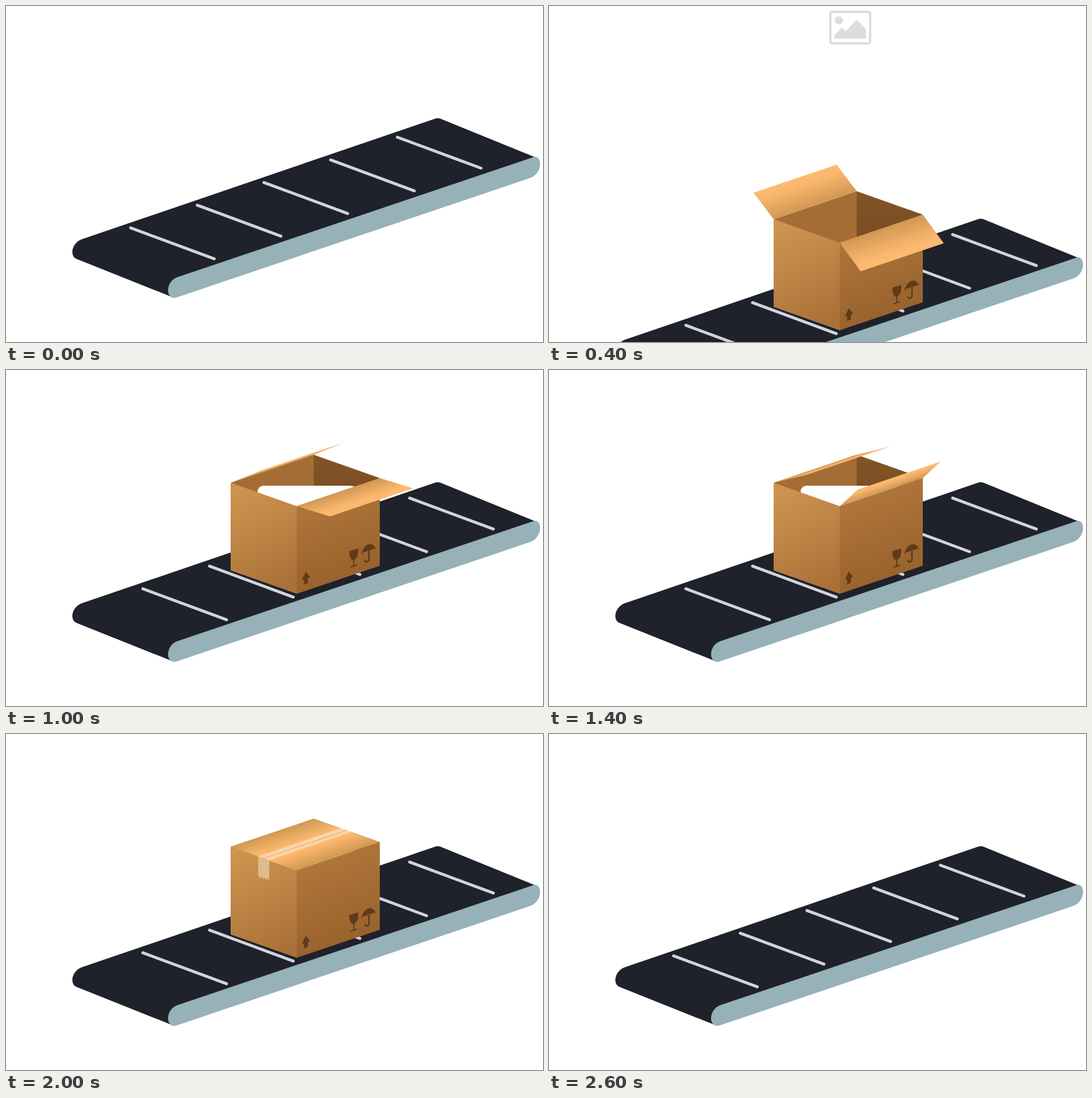
Write an HTML page without scripts that moves like this. It is 918 px wide and 575 px high and loops after 2.8 s.

```html
<!DOCTYPE html>
<html lang="en">
<head>
<meta charset="utf-8">
<title>Packing line</title>
<style>
  /* --n counts the beats of the loop; every pose is a formula of it. */
  @property --n { syntax: "<number>"; inherits: true; initial-value: 0; }
  @keyframes tick { from { --n: 0; } to { --n: 14; } }

  html, body { margin: 0; width: 100%; height: 100%; overflow: hidden; background: #fff; }
  svg {
    display: block; width: 100%; height: 100%;
    animation: tick 2800ms steps(14) -1ms infinite;
    --drop: clamp(0, min(var(--n) - 1, 3 - var(--n)), 1);
    --roll: clamp(0, min(var(--n), 12 - var(--n)), 1);
    --fold: clamp(0, var(--n) - 3, 4);
    --shut: pow(clamp(0, (9 - var(--n)) / 2, 1), 2);
  }

  .picture { opacity: calc(var(--drop)); }
  .scene { transform: translateY(calc(172px * var(--drop))); }
  .slats { transform: translate(calc(21px * var(--roll)), calc(-5.3px * var(--roll))); }
  .box { opacity: clamp(0, min(var(--n), 11 - var(--n)), 1); }
  .card { opacity: clamp(0, var(--n) - 2, 1); }
  .tape { opacity: clamp(0, (var(--n) - 8) / 2, 1); }

  /* Each flap is a unit square: one side on its hinge, the other turned by --turn. */
  .back {
    --turn: calc(1deg * (36 + 108 * pow(.3, var(--fold))) * var(--shut));
    transform: matrix(142, -48,
      calc(57 * cos(var(--turn)) + 20 * sin(var(--turn))),
      calc(20 * cos(var(--turn)) - 50 * sin(var(--turn))), 384, 193);
  }
  .front {
    --turn: calc(1deg * (231 - 27 * var(--fold)) * var(--shut));
    transform: matrix(142, -48,
      calc(-57 * cos(var(--turn))),
      calc(-20 * cos(var(--turn)) - 47 * sin(var(--turn))), 497, 233);
  }
</style>
</head>
<body>
<svg viewBox="0 0 918 575" preserveAspectRatio="none">
  <defs>
    <linearGradient id="flap-shade" x2="0" y2="1">
      <stop stop-color="#d19853"/>
      <stop offset=".75" stop-color="#fab76d"/>
      <stop offset="1" stop-color="#fdbb71"/>
    </linearGradient>
    <linearGradient id="left-shade" x1=".35" x2=".65" y2="1">
      <stop stop-color="#cd944f"/>
      <stop offset="1" stop-color="#aa7038"/>
    </linearGradient>
    <linearGradient id="right-shade" x1=".35" x2=".65" y2="1">
      <stop stop-color="#b3793d"/>
      <stop offset="1" stop-color="#945f2b"/>
    </linearGradient>
    <linearGradient id="inner-shade" x2="0" y2="1">
      <stop stop-color="#845426"/>
      <stop offset="1" stop-color="#784b22"/>
    </linearGradient>
    <path id="slat" d="M213 379.7l143 53"/>
    <g id="slat-pair">
      <use href="#slat"/>
      <use href="#slat" x="114" y="-38.8"/>
    </g>
  </defs>

  <g class="picture" fill="#ddd">
    <rect x="481" y="10" width="68" height="54" rx="3" fill="none" stroke="#ddd" stroke-width="4"/>
    <circle cx="495.5" cy="24.5" r="7"/>
    <path d="M488 56v-6l12-13 7 6 19-19.500 16 16.500v16z"/>
  </g>

  <g class="scene">
    <path fill="#1f212b" d="M130 399L733 193Q738 191 743 193L905 259 292 482 285 498.500 121 433C113 430 112 421 115 413 118 406 124 401 130 399z"/>
    <path fill="#96b1b8" d="M293 464L902 258.500C908 256 913 262 913 270 913 280 907 290 897 294L291 499C282 501.500 277 494 277 487 277 476 284 467 293 464z"/>
    <g class="slats" stroke="#d0d5db" stroke-width="5" stroke-linecap="round">
      <use href="#slat-pair"/>
      <use href="#slat-pair" x="228" y="-77.6"/>
      <use href="#slat" x="456" y="-155.2"/>
    </g>

    <g class="box">
      <path fill="#a56d36" d="M384 193l142-48v88l-29 10z"/>
      <path fill="url(#inner-shade)" d="M526 145l113 40-113 48z"/>
      <rect class="card" x="430" y="198" width="170" height="100" rx="10" fill="#fff"/>
      <rect class="back" width="1" height="1" fill="url(#flap-shade)"/>
      <path fill="url(#left-shade)" d="M384 193l113 40v150l-113-40z"/>
      <path fill="url(#right-shade)" d="M497 233l142-48v150l-142 48z"/>

      <g class="marks" fill="#5f3b18">
        <path d="M512.500 345l7.500 9.500-4 1.300v8.700l-6.500 2.200v-8.500l-4 1.300z"/>
        <path d="M587 310l15-4.500C602.500 315 601 322 595.500 324.500V334.500L600 333V335L589 338.700V336.700L593.500 335V325.300C589 324.500 586.500 319 587 310z"/>
        <path d="M607.500 316C609 306 615 299 621 298 627 297.500 631 301 632 307Q628 304 624.500 308.500 620 305.500 616 311.300 611 310 607.500 316z"/>
        <path d="M620.500 308v15c0 6-6 7.500-7 2" fill="none" stroke="#5f3b18" stroke-width="2.600"/>
      </g>

      <rect class="front" width="1" height="1" fill="url(#flap-shade)"/>

      <g class="tape">
        <path fill="#fcd5a6" d="M431 209.500l142-48.500 17.500 6.500L450 216z"/>
        <path d="M440 213l142-48" stroke="#d9a468"/>
        <path fill="#deba8e" d="M431 209.500l19 6.500v35.500l-3-5-2 3.500-3-5-2 3.500-3-5-2 3.500-4-5z"/>
      </g>
    </g>
  </g>
</svg>
</body>
</html>
```
